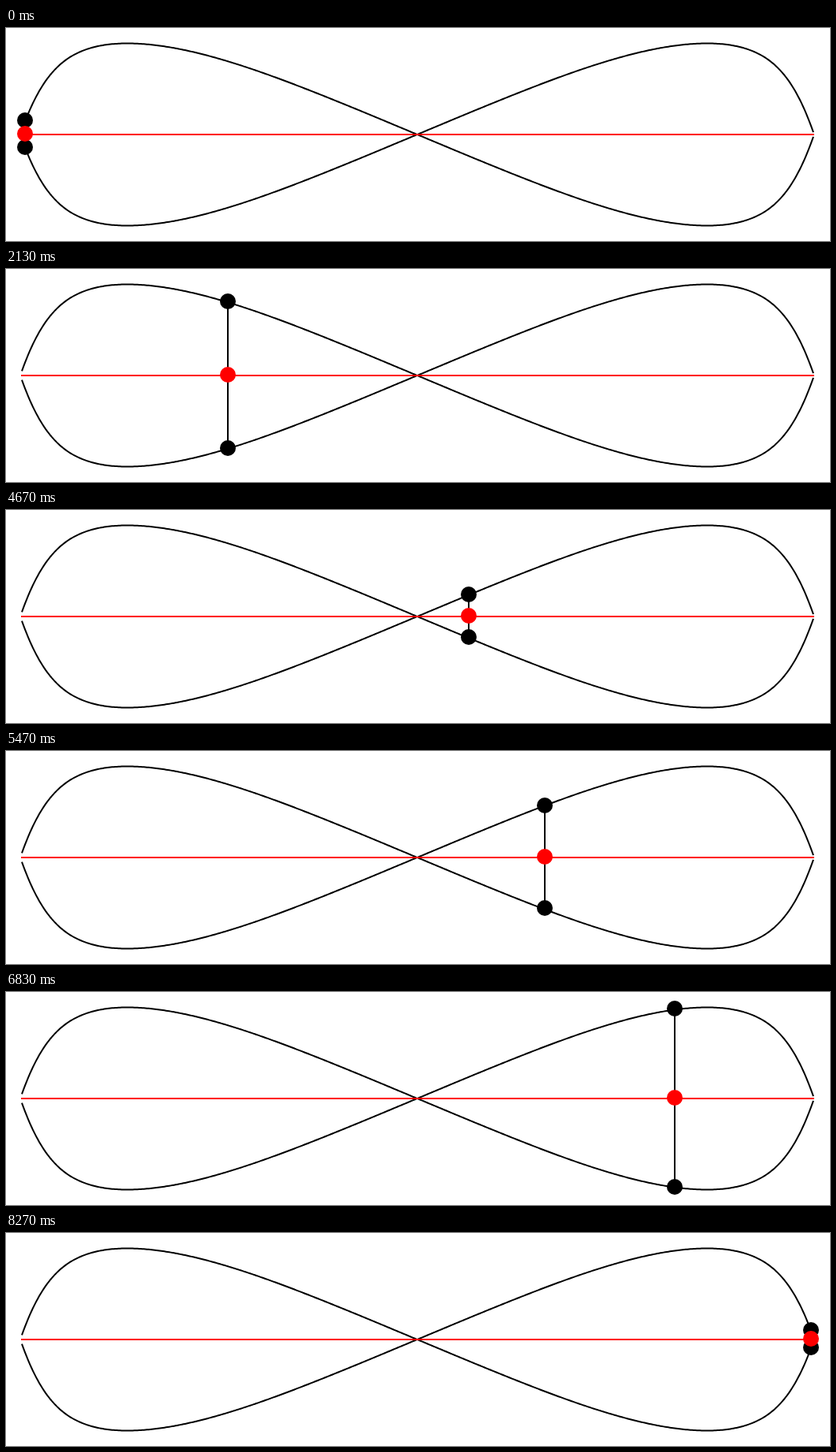
An HTML page with a canvas for the animation above (8.31 s loop, 1040 by 270 pixels).

```html
<!DOCTYPE html>
<html lang="en">
<head>
<meta charset="utf-8">
<title>Standing wave</title>
<style>
  html, body { margin: 0; width: 100%; height: 100%; overflow: hidden; background: #fff; }
  canvas { display: block; }
</style>
</head>
<body>
<canvas id="stage" width="1040" height="270"></canvas>
<script>
const ctx = document.getElementById('stage').getContext('2d');

const LOOP = 8310;
const LAST_STEP = 248;
const LEFT = 20, RIGHT = 1019;
const CENTER = 519, HALF = 501;
const AXIS = 135, PEAK = 115.5;
const DOT_AXIS = 134, RADIUS = 10;

// Sine wave whose phase runs faster towards both ends.
function amplitude(x) {
  const v = (x - CENTER) / HALF;
  const w = v * v;
  return PEAK * Math.sin(v * (1.825 + 0.57 * w + 0.7466 * w ** 5.5));
}

function wavePath(sign) {
  const path = new Path2D();
  for (let x = LEFT; x < RIGHT; x += 2) path.lineTo(x, AXIS + sign * amplitude(x));
  path.lineTo(RIGHT, AXIS + sign * amplitude(RIGHT));
  return path;
}

const waves = [wavePath(-1), wavePath(1)];

function line(x1, y1, x2, y2, color) {
  ctx.strokeStyle = color;
  ctx.beginPath();
  ctx.moveTo(x1, y1);
  ctx.lineTo(x2, y2);
  ctx.stroke();
}

function dot(x, y, color) {
  ctx.fillStyle = color;
  ctx.beginPath();
  ctx.arc(x, y, RADIUS, 0, Math.PI * 2);
  ctx.fill();
}

// Thirty steps a second, each starting on the nearest 10 ms.
function stepAt(ms) {
  return Math.min(LAST_STEP, Math.floor((Math.floor(ms / 10) + 0.5) * 0.3));
}

function draw(ms) {
  const x = 24 + 4 * stepAt(ms);
  const reach = 2 * Math.floor(amplitude(x) / 2) + 1;

  ctx.fillStyle = '#fff';
  ctx.fillRect(0, 0, 1040, 270);
  ctx.lineWidth = 2;
  ctx.strokeStyle = '#000';
  waves.forEach(path => ctx.stroke(path));
  line(19, AXIS, 1020, AXIS, '#f00');

  line(x, DOT_AXIS - reach, x, DOT_AXIS + reach, '#000');
  dot(x, DOT_AXIS - reach, '#000');
  dot(x, DOT_AXIS + reach, '#000');
  dot(x, DOT_AXIS, '#f00');
}

let start;
function tick(now) {
  start ??= now;
  draw((now - start) % LOOP);
  requestAnimationFrame(tick);
}
draw(0);
requestAnimationFrame(tick);
</script>
</body>
</html>
```
